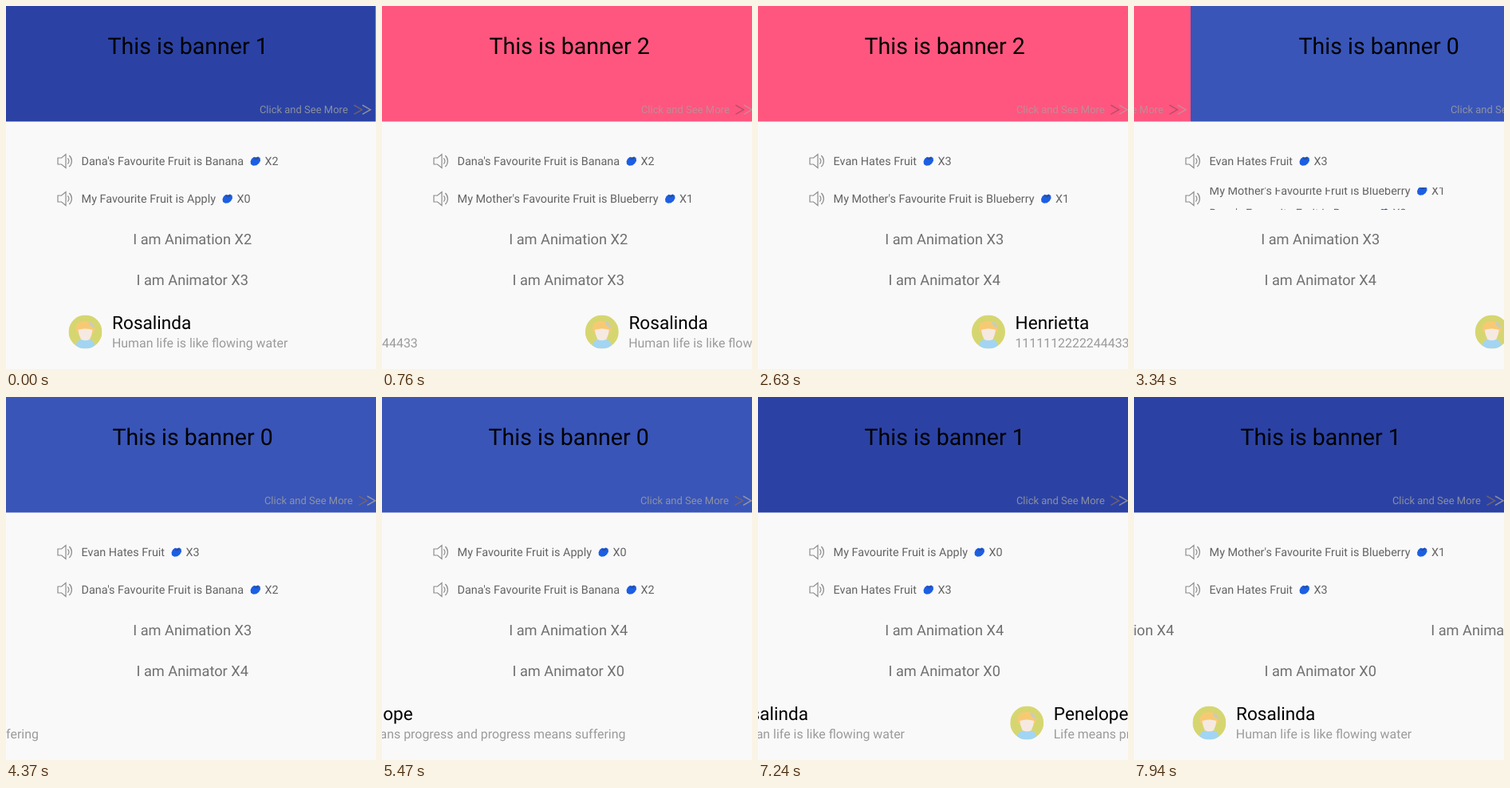
Animation of 464x454 px, one loop 8.01 s. Source, as an HTML page:

```html
<!DOCTYPE html>
<html lang="en">
<head>
<meta charset="utf-8">
<title>Banner and marquee demo</title>
<style>
  html, body { margin: 0; width: 100%; height: 100%; overflow: hidden; background: #f9f9f9; }
  svg { display: block; width: 464px; height: 454px; font-family: Roboto, sans-serif; text-rendering: geometricPrecision; }
  text { white-space: pre; }
</style>
</head>
<body>
<svg id="stage" viewBox="0 0 464 454"></svg>
<script>
const LOOP = 8010;
const TICK = 10;    // clock resolution in ms
const PAGE = 471;   // page width, a little wider than the stage
const LEFT = -2;    // left edge of a resting page
const MID = 233.7;
const stage = document.getElementById('stage');

function el(parent, tag, attrs = {}, text) {
  const node = document.createElementNS('http://www.w3.org/2000/svg', tag);
  for (const key in attrs) node.setAttribute(key, attrs[key]);
  if (text !== undefined) node.textContent = text;
  parent.appendChild(node);
  return node;
}

function label(parent, x, y, size, fill, text, anchor = 'start') {
  return el(parent, 'text', { x, y, 'font-size': size, fill, 'text-anchor': anchor }, text);
}

function line(parent, d, stroke, width) {
  return el(parent, 'path', { d, stroke, 'stroke-width': width, fill: 'none' });
}

function clipped(id, y, height) {
  const clip = el(stage, 'clipPath', { id });
  el(clip, 'rect', { x: 0, y, width: 464, height });
  return el(stage, 'g', { 'clip-path': `url(#${id})` });
}

const move = (node, x, y) => node.setAttribute('transform', `translate(${x.toFixed(2)} ${y.toFixed(2)})`);
const quintOut = p => 1 - (1 - p) ** 5;
const sine = p => (1 - Math.cos(Math.PI * p)) / 2;

// Banner pages
const PAGES = [
  { bg: '#3955b8', more: '#8e92a3', a: '#75616c', b: '#9295a2' },
  { bg: '#2b42a4', more: '#8c8f9f', a: '#70606a', b: '#8c8f9f' },
  { bg: '#ff567f', more: '#c48a97', a: '#bf4d68', b: '#d08796' }
];

function bannerPage(parent, page, i) {
  const g = el(parent, 'g');
  el(g, 'rect', { x: LEFT, y: 0, width: PAGE, height: 144.5, fill: page.bg });
  label(g, MID + .4, 60.4, 28.55, '#000', 'This is banner ' + i, 'middle');
  label(g, 323.9, 134.3, 13, page.more, 'Click and See More');
  line(g, 'M442.5 124l10 5.7-10 5.7', page.a, 1.5);
  line(g, 'M453 124l10 5.7-10 5.7', page.b, 1.5);
  return g;
}

// Notice rows
const NOTICES = [
  'My Favourite Fruit is Apply',
  "My Mother's Favourite Fruit is Blueberry",
  "Dana's Favourite Fruit is Banana",
  'Evan Hates Fruit'
];

function berry(parent, x, y) {
  const g = el(parent, 'g', { transform: `translate(${x} ${y})` });
  el(g, 'path', { d: 'M.5 6.500L2 3 5 .8l3 .6 2-1 2.600 1.600.4 3.500-2 3.500L8 11.300l-4 .4L1 10z', fill: '#1c5fe4' });
  el(g, 'path', { d: 'M4 1.500l2 1.300L8 1.400l2-1 1 2-2.500 1.800-3-.2z', fill: '#2a4c9c' });
}

function notice(parent, text, i, y) {
  const g = el(parent, 'g');
  const node = label(g, 94.6, y + 5, 14.4, '#636363', text);
  const end = 94.6 + node.getComputedTextLength();
  berry(g, end + 8, y - 6);
  label(g, end + 26.5, y + 5, 14.4, '#636363', 'X' + i);
  return g;
}

function speaker(y) {
  line(stage, `M65 ${y - 4}h4.6l5.4-4.4v16.8l-5.4-4.4H65zM77.3 ${y - 3.6}a4.8 4.8 0 0 1 0 7.2M79.3 ${y - 7}a9.4 9.4 0 0 1 0 14`, '#8c8c8c', 1.2);
}

function noticeRow(id, y) {
  speaker(y);
  const row = clipped(id, y - 14, 28);
  return NOTICES.map((text, i) => notice(row, text, i, y));
}

function countRow(id, y, text) {
  const row = clipped(id, y - 15, 30);
  return [0, 1, 2, 3, 4].map(i => {
    const g = el(row, 'g');
    label(g, MID, y + 6.6, 18.2, '#707070', `${text} X${i}`, 'middle');
    return g;
  });
}

const banner = el(stage, 'g');
const rings = [
  { items: PAGES.map((p, i) => bannerPage(banner, p, i)), first: 1, start: -3, period: 3000, dur: 1100, ease: quintOut, dx: PAGE, dy: 0 },
  { items: noticeRow('n1', 194), first: 2, start: 1390, period: 3000, dur: 300, ease: sine, dx: 0, dy: 28 },
  { items: noticeRow('n2', 241), first: 0, start: 220, period: 3000, dur: 300, ease: sine, dx: 0, dy: 28 },
  { items: countRow('c1', 291, 'I am Animation'), first: 2, start: 1658, period: 3000, dur: 532, ease: sine, dx: PAGE, dy: 0 },
  { items: countRow('c2', 342, 'I am Animator'), first: 3, start: 900, period: 4000, dur: 500, ease: sine, dx: 0, dy: 30 }
];

function turn(ring, t) {
  const { items, first, start, period, dur, ease, dx, dy } = ring;
  const n = Math.floor((t - start) / period);
  const p = ease(Math.min(1, (t - start - n * period) / dur));
  const count = items.length;
  const from = (first + n + count) % count;
  const to = (from + 1) % count;
  // whole pixels keep neighbouring pages flush
  const x = Math.round(p * dx);
  const y = Math.round(p * dy);
  items.forEach((item, i) => {
    const shown = i === to || (i === from && p < 1);
    item.setAttribute('visibility', shown ? 'visible' : 'hidden');
    if (i === to) move(item, dx - x, dy - y);
    else if (shown) move(item, -x, -y);
  });
}

// Profile cards drifting to the right
const face = el(stage, 'clipPath', { id: 'face' });
el(face, 'circle', { cx: 21, cy: 21, r: 21 });

function card(name, motto) {
  const g = el(stage, 'g');
  const a = el(g, 'g', { 'clip-path': 'url(#face)' });
  el(a, 'rect', { width: 42, height: 42, fill: '#d6d671' });
  el(a, 'path', { d: 'M7 42l3-7q1.500-3.500 5-4h12q3.500.5 5 4l3 7z', fill: '#a2d5f3' });
  el(a, 'path', { d: 'M10 21C7 11 14 7.500 21 7.500S35 11 32 21L29 23H13z', fill: '#f8c973' });
  el(a, 'path', { d: 'M12 18.500q9-3 18 0l-1 5.500-2.500 6.500q-5.500 2.500-11 0L13 24z', fill: '#f6e9e1' });
  el(a, 'path', { d: 'M25 8l4 1 3 4 1 4-4-2-3-3z', fill: '#c9cdb6' });
  label(g, 54.6, 17.5, 22.6, '#000', name);
  label(g, 54.4, 40.3, 15.93, '#9b9b9b', motto);
  return g;
}

const ROSALINDA = ['Rosalinda', 'Human life is like flowing water'];
const passes = [
  { who: ROSALINDA, t: 0, x: 78.5, v: .232 },
  { who: ['Henrietta', '1111112222244433'], t: 1710, x: 61, v: .225 },
  { who: ['Penelope', 'Life means progress and progress means suffering'], t: 4370, x: -374, v: .2405 },
  { who: ROSALINDA, t: 6540, x: -255, v: .2346 }
];
for (const pass of passes) pass.node = card(...pass.who);

function draw() {
  const t = Math.floor(performance.now() % LOOP / TICK) * TICK;
  rings.forEach(ring => turn(ring, t));
  for (const { node, t: at, x, v } of passes) move(node, x + v * (t - at), 386.5);
  requestAnimationFrame(draw);
}
draw();
</script>
</body>
</html>
```
